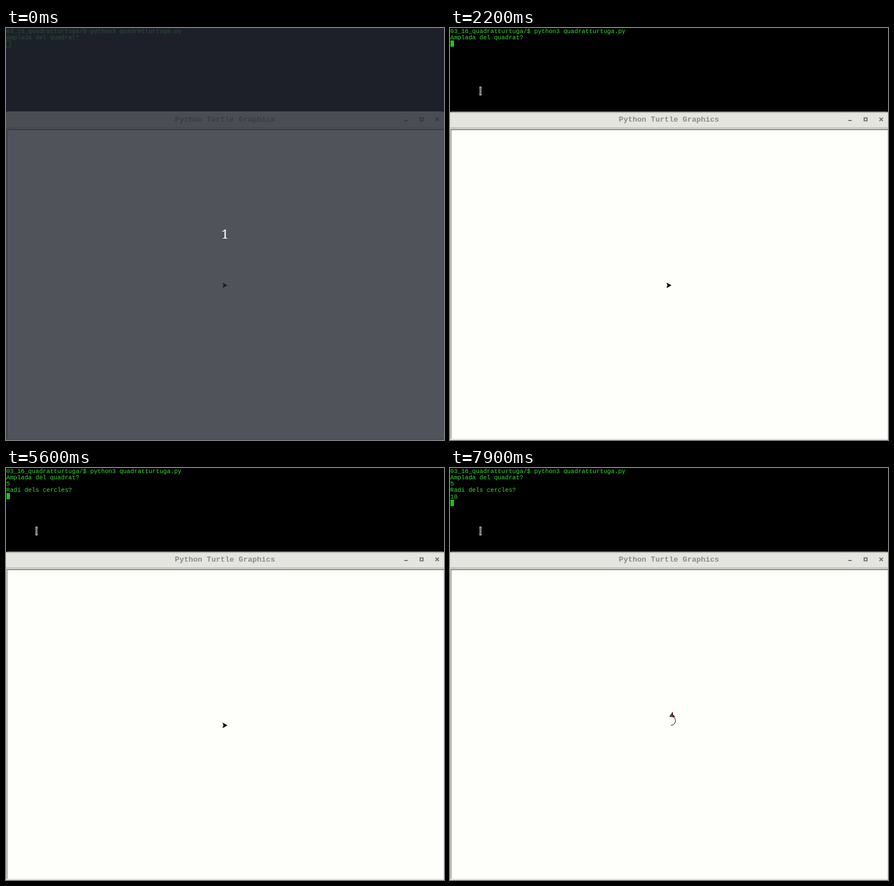
These frames come from a looping animation (772 px wide and 726 px high, 8 s). An HTML page:

```html
<!DOCTYPE html>
<html lang="ca">
<head>
<meta charset="utf-8">
<title>Turtle drawing</title>
<style>
  html, body { margin: 0; width: 100%; height: 100%; overflow: hidden; background: #000; }
  svg { display: block; }
  .term { font: 10.73px "Liberation Mono", "Courier New", monospace; fill: #3cda3c; white-space: pre; }
  .title { font: bold 13.4px "Liberation Mono", "Courier New", monospace; fill: #8b8c88; }
  .count { font: 22px "Noto Serif", serif; fill: #fff; }
  .icon { fill: none; stroke: #777874; stroke-width: 2; }
</style>
</head>
<body>
<svg width="772" height="726" viewBox="0 0 772 726">
  <defs>
    <linearGradient id="bar" x1="0" y1="0" x2="0" y2="1">
      <stop offset="0" stop-color="#e8e9e4"/>
      <stop offset="1" stop-color="#e2e3dd"/>
    </linearGradient>
    <linearGradient id="edge" x1="0" y1="0" x2="0" y2="1">
      <stop offset="0" stop-color="#777874"/>
      <stop offset="1" stop-color="#e6e7e1"/>
    </linearGradient>
  </defs>
  <rect width="772" height="726" fill="#000"/>

  <g id="lines" class="term"></g>
  <rect id="hollow" x=".5" y="21.5" width="7" height="12" fill="none" stroke="#18c818"/>
  <rect id="cursor" width="6" height="11" fill="#18c818"/>
  <g id="pointer" fill="none">
    <path id="beam" d="M-2-6H-.8L0-5.2L.8-6H2M0-5.2V5.2M-2 6H-.8L0 5.2L.8 6H2" stroke="#fff" stroke-width="2.8"/>
    <use href="#beam" style="display:none"/>
    <path d="M-2-6H-.8L0-5.2L.8-6H2M0-5.2V5.2M-2 6H-.8L0 5.2L.8 6H2" stroke="#000" stroke-width="1"/>
  </g>

  <path d="M0 726V151Q0 147 4 147H768Q772 147 772 151V726Z" fill="url(#bar)"/>
  <path id="shine" d="M4 147.5H768" stroke="#f6f7f2"/>
  <g id="shade">
    <rect y="146" width="772" height="1.5"/>
    <rect y="147.5" width="772" height="2.5" fill="url(#edge)"/>
  </g>
  <rect y="150" width="772" height="576" fill="#e4e5df"/>
  <text class="title" x="386" y="164.5" text-anchor="middle">Python Turtle Graphics</text>
  <g class="icon">
    <path d="M702 163H708M757 158L763 164M763 158L757 164"/>
    <rect x="730" y="158.5" width="5" height="5"/>
  </g>
  <rect y="175" width="772" height="2" fill="#c3c4bf"/>
  <rect y="177" width="772" height="1" fill="#dcddd8"/>
  <rect x="1" y="178" width="771" height="547" fill="#8d8e8a"/>
  <rect x="2.5" y="180" width="769.5" height="544" fill="#fefffb"/>
  <path d="M1 724.5H772M771.5 180V726" stroke="#e1e2dd"/>

  <path id="trail" fill="none" stroke="#000"/>
  <path id="turtle" d="M0 0L-7.2-4L-5.6 0L-7.2 4Z" stroke="#000"/>

  <g id="intro">
    <rect width="772" height="726" fill="#252933" fill-opacity=".8"/>
    <text class="count" x="386" y="370.5" text-anchor="middle">1</text>
  </g>
</svg>
<script>
const LOOP = 8000, COL = 6.44, ROW = 11.25;
const HOME = { x: 389.5, y: 453.5 }, RADIUS = 8, SIDES = 13;
const $ = id => document.getElementById(id);

// Terminal rows: each piece of text and the time it appears
const rows = [
  [[0, "03_16_quadratturtuga/$ python3 quadratturtuga.py"]],
  [[0, "Amplada del quadrat?"]],
  [[3800, "5"]],
  [[4300, "Radi dels cercles?"]],
  [[6300, "1"], [6400, "0"]]
];
// Solid cursor: start time, row, column (row -1 hides it)
const cursorSteps = [
  [0, -1], [1000, 2, 0], [1700, -1], [2200, 2, 0], [2900, -1], [3600, 2, 0],
  [3800, 2, 1], [4300, 4, 0], [4900, -1], [5600, 4, 0], [6300, 4, 1],
  [6400, 4, 2], [7000, -1], [7500, 4, 2], [7600, 5, 0]
];

const lineNodes = rows.map((_, i) => {
  const node = document.createElementNS("http://www.w3.org/2000/svg", "text");
  node.setAttribute("x", 0.5);
  node.setAttribute("y", 8.5 + i * ROW);
  return $("lines").appendChild(node);
});

const show = (id, on) => $(id).setAttribute("visibility", on ? "visible" : "hidden");
const place = (id, x, y, turn = 0) =>
  $(id).setAttribute("transform", `translate(${x} ${y}) rotate(${turn})`);

// Corner k of the polygon the turtle walks as its circle
function corner(k) {
  const a = k * 2 * Math.PI / SIDES;
  return { x: HOME.x + RADIUS * Math.sin(a), y: HOME.y - RADIUS * (1 - Math.cos(a)) };
}

function drawTurtle(t) {
  const walking = t >= 7600;
  const k = walking ? 1 + 2 * Math.floor((t - 7600) / 100) : 0;
  const points = Array.from({ length: k + 1 }, (_, i) => corner(i));
  const tip = points[k];
  $("trail").setAttribute("d", "M" + points.map(p => `${p.x} ${p.y}`).join("L"));
  $("turtle").setAttribute("fill", walking ? "#f01030" : "#000");
  place("turtle", tip.x, tip.y, walking ? -(k + 0.5) * 360 / SIDES : 0);
}

function render(t) {
  rows.forEach((parts, i) => {
    const text = parts.filter(p => t >= p[0]).map(p => p[1]).join("");
    if (lineNodes[i].textContent !== text) lineNodes[i].textContent = text;
  });

  const [, row, col] = cursorSteps.filter(s => t >= s[0]).pop();
  show("cursor", row >= 0);
  if (row >= 0) place("cursor", Math.round(1 + col * COL), Math.floor(row * 11.2));

  const focused = t >= 1000;
  show("hollow", !focused);
  show("shine", !focused);
  show("shade", focused);

  show("pointer", t >= 1900);
  if (t < 2200) place("pointer", 39, 128);
  else place("pointer", 53.7, 111);

  drawTurtle(t);
  show("intro", t < 500);
}

const start = performance.now();
function tick() {
  render((performance.now() - start) % LOOP);
  requestAnimationFrame(tick);
}
render(0);
requestAnimationFrame(tick);
</script>
</body>
</html>
```
